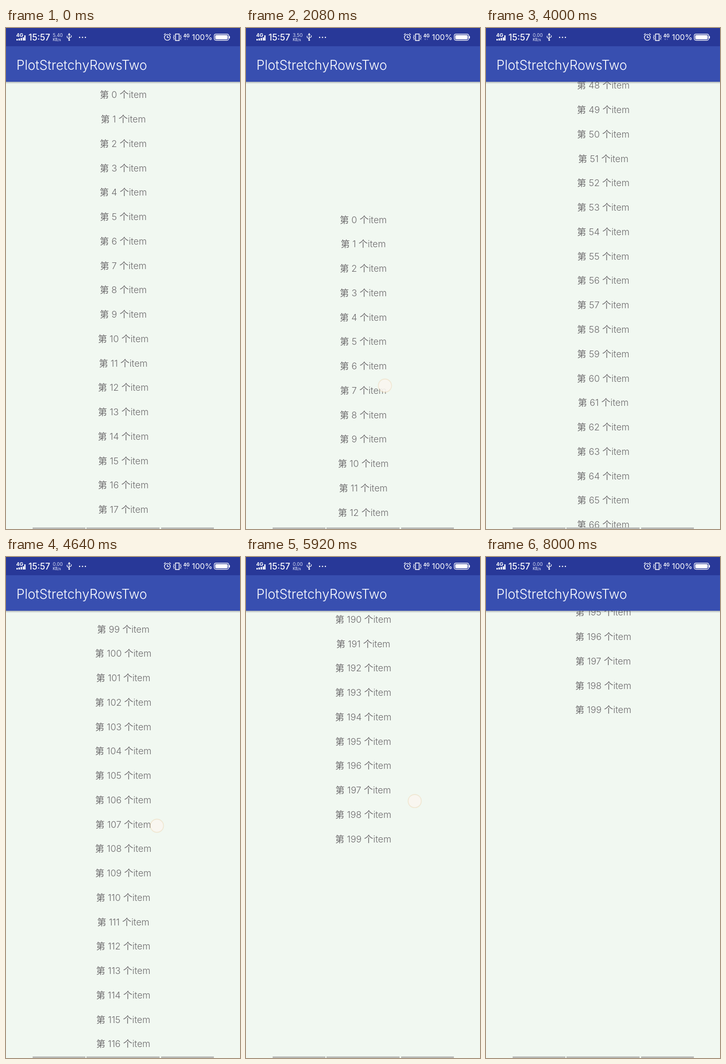
An HTML page with a canvas that plays this animation: 448x960 px, repeating every 8.16 s.

```html
<!DOCTYPE html>
<html lang="zh-CN">
<head>
<meta charset="utf-8">
<style>
html, body { margin: 0; width: 100%; height: 100%; overflow: hidden; background: #f1f8f1; }
canvas { display: block; }
</style>
</head>
<body>
<canvas id="stage" width="448" height="960"></canvas>
<script>
const g = document.getElementById('stage').getContext('2d');
const LOOP = 8160, STEP = 160, PITCH = 46.76, COUNT = 200;
const FAMILY = 'Inter, "Noto Sans CJK SC", "Noto Sans CJK", Roboto, sans-serif';

// Centre of row 0 when the list rests at its start and at its end
const HEAD = 128, TAIL = -8368;
const SPRING = 80, TAP = 160;

// Each gesture moves the list by `by` while the finger goes from y to y2
const GESTURES = [
  { start: 1040, end: 2240, by: 276, x: 266, y: 453, y2: 721 },
  { start: 2880, end: 3520, by: 163, x: 285, y: 473, y2: 636 },
  { start: 3760, end: 4600, by: -4619, x: 288, y: 600, y2: 420, fling: true },
  { start: 4640, end: 5440, by: -3877, x: 289, y: 515, y2: 380, fling: true },
  { start: 5440, end: 6000, by: -463, x: 323, y: 790, y2: 414 },
  { start: 6350, end: 7990, by: -730, x: 310, y: 850, y2: 472 }
];

// Past either end the list springs back once it is let go
function listTop(t) {
  let home = HEAD, top = HEAD;
  for (const { start, end, by, fling } of GESTURES) {
    if (t < start) break;
    const p = Math.min(1, (t - start) / (end - start));
    const pos = home + by * (fling ? 1 - (1 - p) ** 2 : p);
    if (t < end) return pos;
    home = Math.max(TAIL, Math.min(HEAD, pos));
    top = home + (pos - home) * Math.exp((end - t) / SPRING);
  }
  return top;
}

function text(s, x, y, size, weight = 400, color = '#fff', align = 'left') {
  g.font = `${weight} ${size}px ${FAMILY}`;
  g.fillStyle = color;
  g.textAlign = align;
  g.fillText(s, x, y);
}

function rect(x, y, w, h, color = '#fff') {
  g.fillStyle = color;
  g.fillRect(x, y, w, h);
}

function dot(x, y, r, color = '#fff') {
  g.fillStyle = color;
  g.beginPath();
  g.arc(x, y, r, 0, Math.PI * 2);
  g.fill();
}

function line(path, width = 1.3, color = '#fff') {
  g.strokeStyle = color;
  g.lineWidth = width;
  g.stroke(new Path2D(path));
}

function drawList(t) {
  const top = listTop(t);
  const first = Math.max(0, Math.floor((80 - top) / PITCH));
  for (let i = first; i < COUNT; i++) {
    const y = top + i * PITCH;
    if (y > 985) break;
    text(`第 ${i} 个item`, 224.5, y + 6.3, 17.5, 350, '#6c6a6c', 'center');
  }
}

function drawStatus(t) {
  text('4G', 19.5, 16.5, 9.5, 700);
  for (let i = 0; i < 4; i++) rect(20 + i * 4, 21 - i, 2.6, 3 + i);
  rect(35, 14, 2.4, 10);
  text('15:57', 43, 24, 16.6, 500);
  const speed = t < 640 ? '5.40' : t < 2400 ? '3.50' : '0.00';
  text(speed, 89.5, 17, 9, 400, '#dde1f5');
  text('KB/s', 89.5, 24.5, 7, 500, '#dde1f5');

  // USB
  line('M121 12V23M117 15V18L121 21M125 14V17L121 19.5M119 13.5L121 10.5L123 13.5', 1.2);
  dot(121, 23, 1.6);
  for (let i = 0; i < 3; i++) dot(141 + i * 5.5, 18, 1.25);

  // Alarm and vibration
  line('M314.5 18a5.6 5.6 0 1 1-11.2 0a5.6 5.6 0 1 1 11.2 0M309 14.5V18.3H312M302.5 13L305.5 10.5M312.5 10.5L315.5 13');
  line('M324.5 11.5H331.5V24H324.5Z', 1.5);
  line('M321 13.5L322 15.5L320.5 18L322 20.5L321 22.5M335 13.5L334 15.5L335.5 18L334 20.5L335 22.5', 1.1);

  text('4G', 339.5, 18, 8.5, 700);
  rect(342, 20, 2, 3, '#7180c4');
  rect(346, 20, 2, 3, '#5263b2');
  text('100%', 356, 23, 14.8);

  // Battery
  g.strokeStyle = g.fillStyle = '#fff';
  g.lineWidth = 1.1;
  g.beginPath();
  g.roundRect(398.6, 11.6, 27.8, 12, 3.5);
  g.stroke();
  g.beginPath();
  g.roundRect(400.5, 13.5, 24, 8.2, 2);
  g.fill();
  rect(427, 15.5, 1.6, 4.5);
}

function drawHeader(t) {
  const shade = g.createLinearGradient(0, 103, 0, 107);
  shade.addColorStop(0, 'rgba(80,85,100,.42)');
  shade.addColorStop(1, 'rgba(80,85,100,0)');
  rect(0, 103, 448, 4, shade);
  rect(0, 0, 448, 35, '#283898');
  rect(0, 35, 448, 68, '#384fb0');
  text('PlotStretchyRowsTwo', 20, 79.5, 25, 350);
  drawStatus(t);
}

function drawTouch(t) {
  const span = m => m.fling ? TAP : m.end - m.start;
  const m = GESTURES.find(m => t >= m.start && t < m.start + span(m));
  if (!m) return;
  const y = m.y + (m.y2 - m.y) * (t - m.start) / span(m);
  dot(m.x, y, 13.4, 'rgba(240,214,180,.5)');
  dot(m.x, y, 11.8, 'rgba(250,249,247,.82)');
}

function draw(t) {
  rect(0, 0, 448, 960, '#f1f8f1');
  drawList(t);
  drawHeader(t);
  for (const [x, w] of [[51, 101], [154, 140], [297, 101]]) rect(x, 957, w, 3, '#b8bab8');
  drawTouch(t);
}

const start = performance.now();
function tick() {
  const t = (performance.now() - start) % LOOP;
  draw(Math.floor(t / STEP) * STEP);
  requestAnimationFrame(tick);
}
tick();
</script>
</body>
</html>
```
